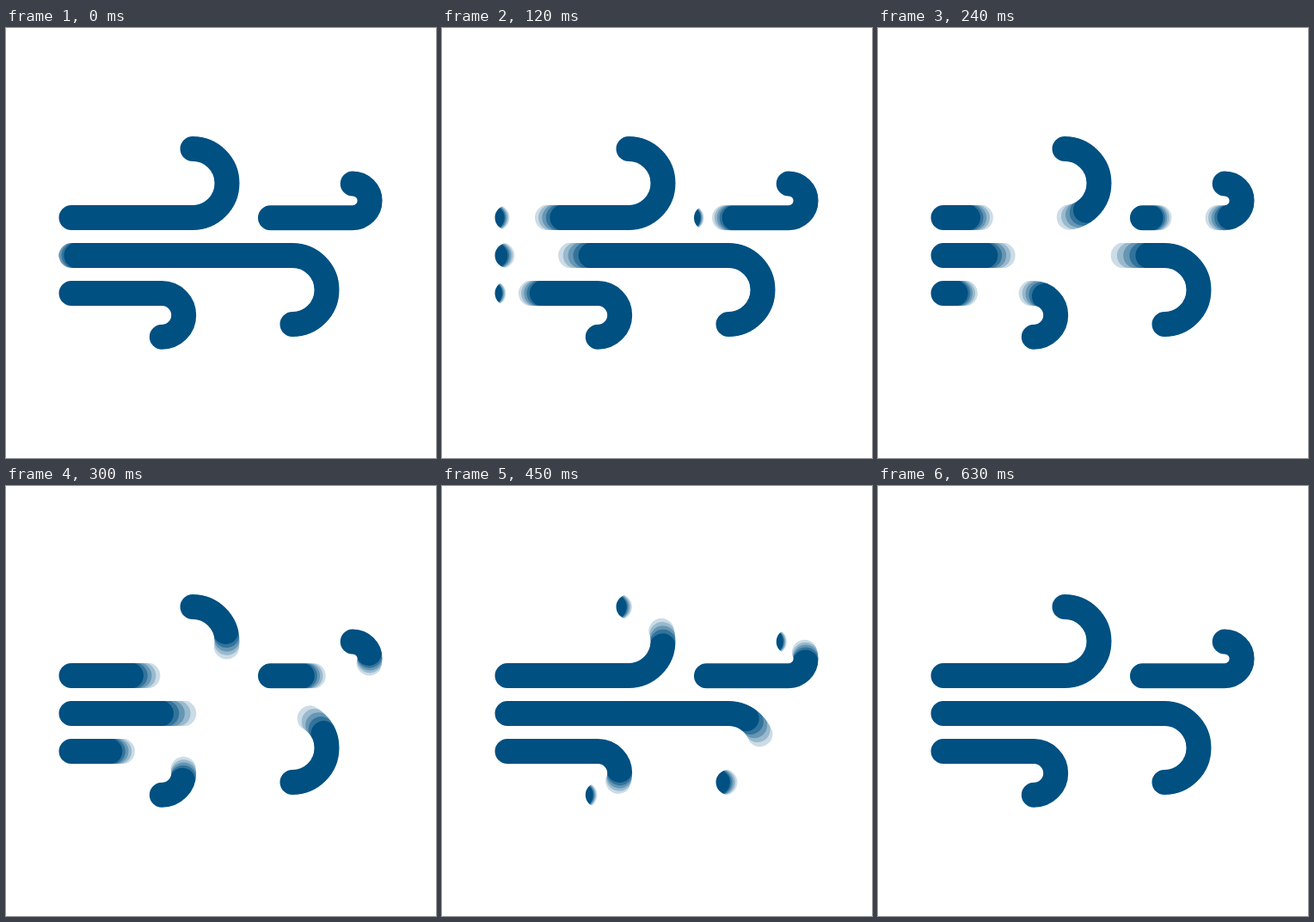
An HTML page with a canvas that plays this animation: 500 by 500 pixels, repeating every 1.05 s.

```html
<!DOCTYPE html>
<html>
<head>
<meta charset="utf-8">
<title>Wind</title>
<style>
  html, body { margin: 0; width: 100%; height: 100%; overflow: hidden; background: #fff; }
  canvas { display: block; }
</style>
</head>
<body>
<canvas id="stage" width="500" height="500"></canvas>
<script>
const ctx = document.getElementById('stage').getContext('2d');
const LOOP = 1050, STEP = 30, TRAVEL = 720;
const HEAD_START = 15, TAIL_START = -135;
const SAMPLES = 5;
const WIDTH = 29, LEAD = 29; // each gust runs LEAD px past both ends, hidden by the mask

// Straight run from x0 to x1 at height y, then a half turn of radius r; dir 1 = down, -1 = up
const gusts = [
  { x0: 76, x1: 217, y: 220.5, r: 40, dir: -1 },
  { x0: 76, x1: 333, y: 264.5, r: 40, dir: 1 },
  { x0: 76, x1: 181.3, y: 308.5, r: 25.4, dir: 1 },
  { x0: 307.5, x1: 403.2, y: 220.7, r: 19.9, dir: -1 }
];

function trace({ x0, x1, y, r, dir }, lead) {
  ctx.moveTo(x0 - lead, y);
  ctx.lineTo(x1, y);
  ctx.arc(x1, y + dir * r, r, -dir * Math.PI / 2, dir * Math.PI / 2, dir < 0);
  if (lead) ctx.lineTo(x1 - lead, y + dir * 2 * r);
}

// cubic-bezier(.5, 0, .5, 1)
function ease(x) {
  if (x <= 0) return 0;
  if (x >= 1) return 1;
  let lo = 0, hi = 1;
  for (let i = 0; i < 24; i++) {
    const u = (lo + hi) / 2;
    if (1.5 * u * (1 - u) + u * u * u < x) lo = u; else hi = u;
  }
  return lo * lo * (3 - 2 * lo);
}

function drawSample(t) {
  const head = ease((t - HEAD_START) / TRAVEL);
  const tail = ease((t - TAIL_START) / TRAVEL);
  for (const g of gusts) {
    const length = g.x1 - g.x0 + Math.PI * g.r + 2 * LEAD;
    ctx.setLineDash([head * length, (tail - head) * length, 2 * length, 0]);
    ctx.beginPath();
    trace(g, LEAD);
    ctx.stroke();
  }
}

function draw(t) {
  ctx.clearRect(0, 0, 500, 500);
  ctx.strokeStyle = '#004f80';
  ctx.lineCap = 'round';

  // Motion blur: equal shares of several moments within the step
  ctx.globalCompositeOperation = 'lighter';
  ctx.globalAlpha = 1 / SAMPLES;
  ctx.lineWidth = WIDTH + 1;
  for (let i = 0; i < SAMPLES; i++) drawSample(t + i * STEP / SAMPLES);

  // Keep only what lies inside the icon
  ctx.globalCompositeOperation = 'destination-in';
  ctx.globalAlpha = 1;
  ctx.lineWidth = WIDTH;
  ctx.setLineDash([]);
  ctx.beginPath();
  for (const g of gusts) trace(g, 0);
  ctx.stroke();
}

const start = performance.now();
function tick() {
  const t = (performance.now() - start) % LOOP;
  draw(Math.floor(t / STEP) * STEP);
  requestAnimationFrame(tick);
}
tick();
</script>
</body>
</html>
```
